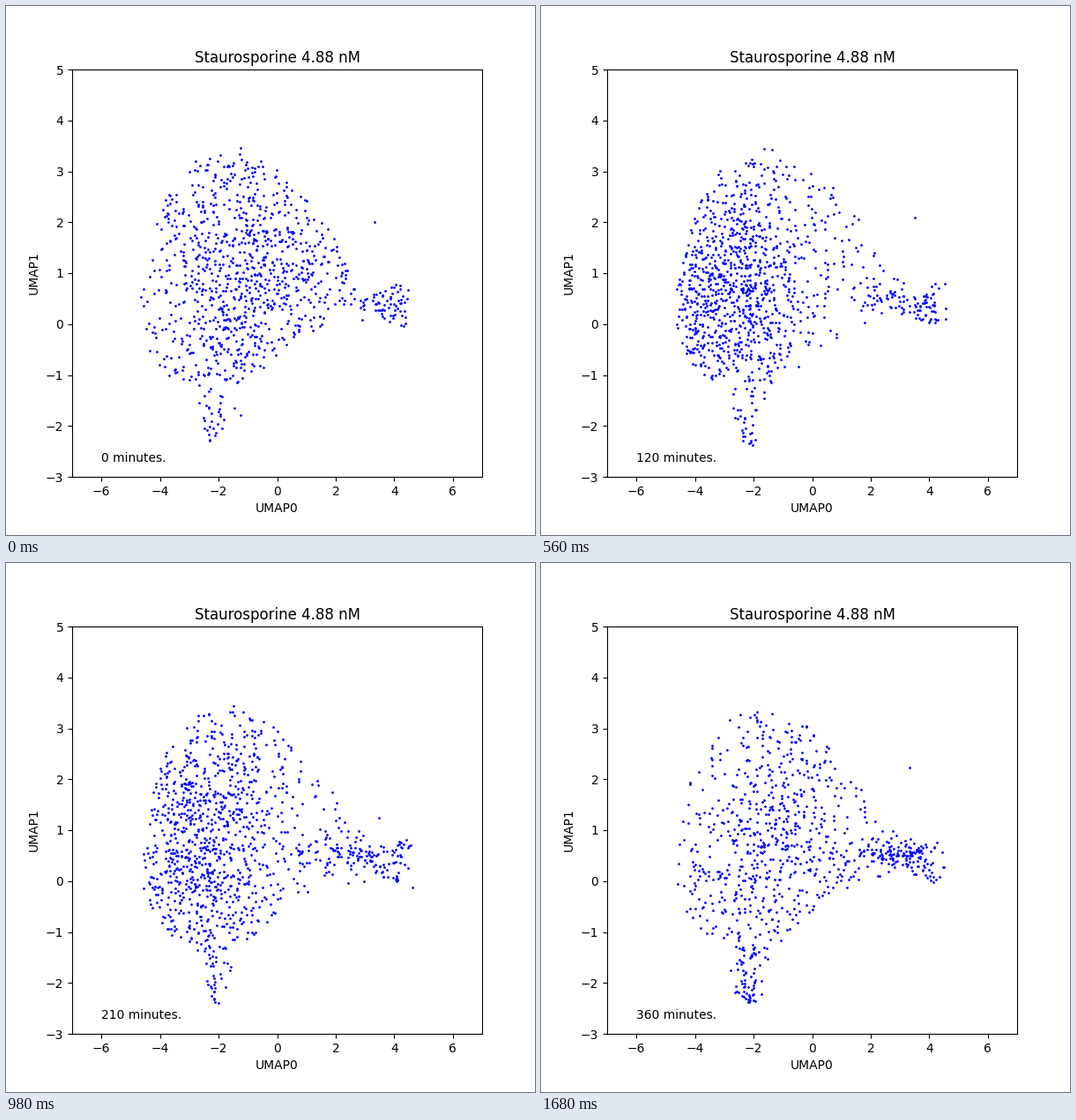
These frames come from a looping animation (600x600 px, 1.82 s). A matplotlib script:

```python
import numpy as np
import matplotlib.pyplot as plt
from matplotlib.animation import FuncAnimation
from matplotlib.path import Path

FRAMES, INTERVAL, STEP = 13, 140, 30  # STEP: minutes per frame

# Edge of the main cloud
EDGE = Path([(-4.72, 0.4), (-4.3, 1.75), (-3.7, 2.7), (-2.7, 3.3),
             (-1.3, 3.5), (-0.4, 3.2), (0.7, 2.7), (1.7, 2.0),
             (2.5, 1.0), (1.8, 0.0), (0.4, -0.4), (-0.9, -1.15),
             (-3.5, -1.2), (-4.3, -0.7), (-4.65, 0.0)])


def inside(pts, n):
    """First n points that fall within the cloud's edge."""
    return pts[EDGE.contains_points(pts)][:int(n)]


def cloud(rng, t):
    """Even scatter plus a dense core that swings left and back."""
    swing = np.sin(np.pi * t ** 0.6)
    total = 900 + 150 * np.sin(np.pi * t) - 260 * t ** 2
    even = total * (0.55 - 0.25 * swing)
    core = (-1.1 - 1.7 * swing, 0.75)
    return np.vstack([
        inside(rng.uniform((-4.8, -1.2), (2.5, 3.5), (3000, 2)), even),
        inside(rng.normal(core, (1.3, 1.25), (3000, 2)), total - even)])


def foot(rng, t):
    """Narrows downwards and fills up with time."""
    y = rng.uniform(-2.4, -1.1, int(34 + 40 * t ** 2))
    x = -2.2 + rng.normal(size=y.size) * (0.17 + 0.17 * (y + 2.4))
    return np.column_stack([x, y])


def bridge(rng, t):
    """Thin link from the cloud to the fan, growing with time."""
    return rng.normal((2.6, 0.52), (0.55, 0.18), (int(18 + 80 * t), 2))


def fan(rng):
    """Widens to the right."""
    x = rng.triangular(2.6, 4.2, 4.65, 60)
    y = 0.38 + 0.21 * (x - 2.2) * rng.uniform(-1, 1, x.size)
    return np.column_stack([x, y])


def cells(i):
    rng = np.random.default_rng(100 + i)
    t = i / (FRAMES - 1)
    stray = rng.normal((3.45, 1.9), (0.1, 0.35), (1, 2))
    return np.vstack([cloud(rng, t), foot(rng, t), bridge(rng, t),
                      fan(rng), stray])


fig, ax = plt.subplots(figsize=(6, 6), dpi=100)
ax.set(xlim=(-7, 7), ylim=(-3, 5), xlabel="UMAP0", ylabel="UMAP1",
       title="Staurosporine 4.88 nM")
dots, = ax.plot([], [], "o", color="blue", markersize=1)
label = ax.text(-6, -2.7, "")


def update(i):
    dots.set_data(*cells(i).T)
    label.set_text(f"{i * STEP} minutes.")
    return dots, label


anim = FuncAnimation(fig, update, frames=FRAMES, interval=INTERVAL,
                     repeat=True, repeat_delay=0)
plt.show()
```
